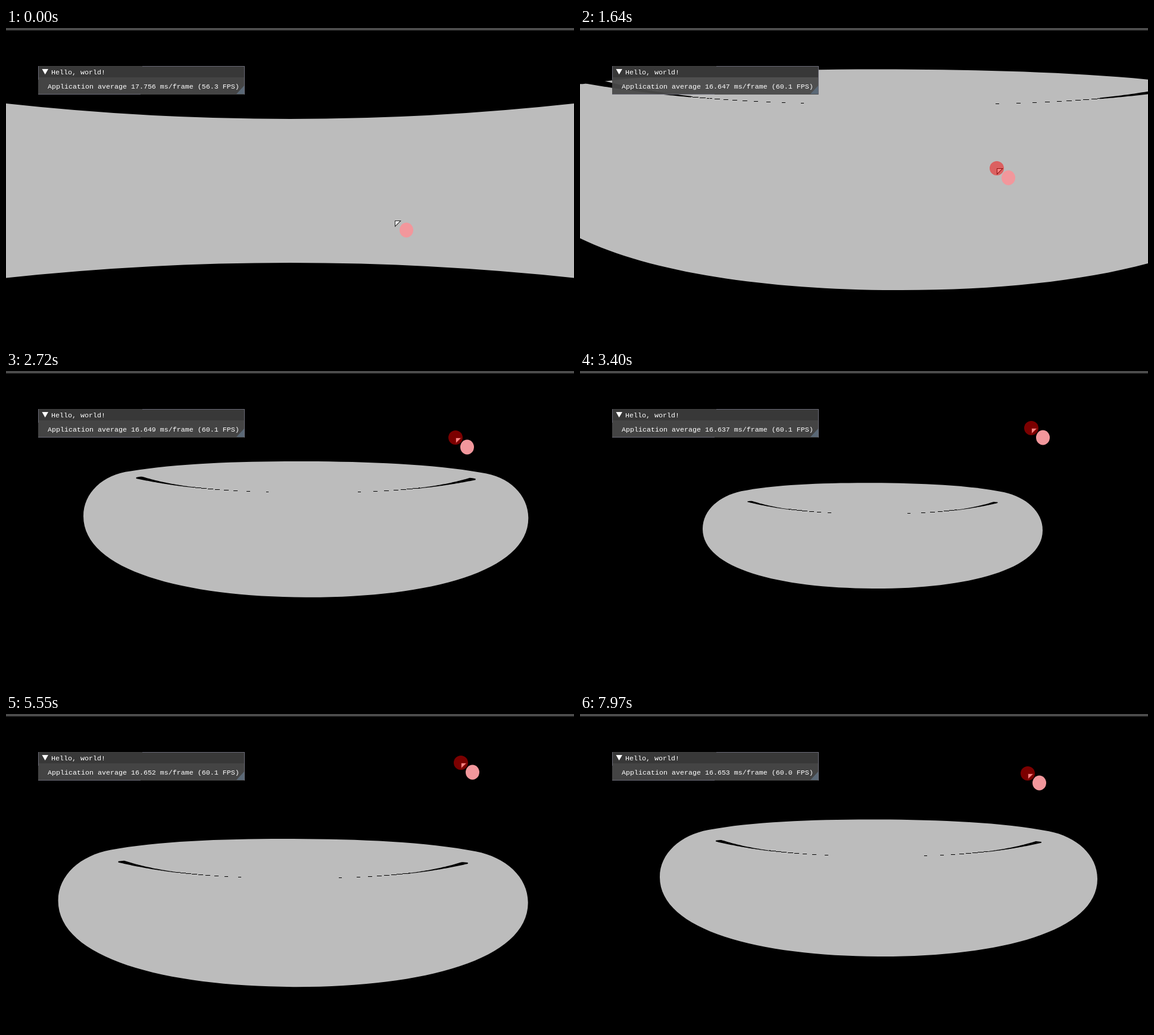
Write an HTML page with a canvas that moves like this. It is 954 px wide and 530 px high and loops after 8000 ms.

```html
<!DOCTYPE html>
<html lang="en">
<head>
<meta charset="utf-8">
<title>Torus viewer</title>
<style>
html, body { margin: 0; width: 100%; height: 100%; overflow: hidden; background: #000; }
canvas { display: block; }
</style>
</head>
<body>
<canvas id="stage" width="954" height="530"></canvas>
<script>
const ctx = document.getElementById('stage').getContext('2d');
const W = 954, H = 530, LOOP = 8000, EXIT = 420;
const GRAY = '#bcbcbc';

// time, centre x, width, y of widest point, bottom y, distance blend
const torusKeys = [
  [420, 480, 5000, 262, 1150, 0],
  [940, 490, 4000, 260, 970, 0],
  [1250, 510, 2600, 245, 710, 0],
  [1640, 530, 1300, 210, 441, 0],
  [1950, 538, 1060, 165, 353, 0],
  [2250, 544, 882, 222, 379, 0],
  [2460, 531, 862, 105, 260, 0.2],
  [2850, 490, 690, 316, 441, 0.9],
  [3400, 491.5, 571, 267, 366, 1.15],
  [4100, 475, 675, 302, 424, 1.05],
  [4640, 493, 762, 313, 452, 1],
  [4930, 518, 826, 311, 460, 1],
  [5400, 488, 800, 314, 460, 1],
  [5760, 474, 774, 318, 458, 1],
  [6460, 477.5, 661, 311, 428, 1.03],
  [7000, 478, 720, 318, 448, 1],
  [7420, 478, 734, 316, 449, 1],
  [7970, 501.5, 735, 276, 408, 1]
];

// time, x, y
const mouseKeys = [
  [0, 653, 324], [500, 640, 325], [940, 636, 325], [1500, 690, 250],
  [2000, 726, 200], [2250, 748, 108], [2460, 744, 165], [2850, 760, 86],
  [3400, 758, 96], [4000, 761, 79], [4640, 765, 83], [5600, 764, 82],
  [6460, 761, 81], [7200, 758, 82], [7970, 752, 100]
];

const frameMs = [
  [0, 17.756], [940, 16.634], [2250, 16.658], [3400, 16.637],
  [4640, 16.652], [6460, 16.652], [7970, 16.653]
];

const mix = (a, b, f) => a + (b - a) * f;

function sample(keys, t) {
  let i = 0;
  while (i < keys.length - 2 && t > keys[i + 1][0]) i++;
  const a = keys[i], b = keys[i + 1];
  const f = Math.min(1, Math.max(0, (t - a[0]) / (b[0] - a[0])));
  return a.slice(1).map((v, n) => mix(v, b[n + 1], f));
}

function fillPoly(color, ...pts) {
  ctx.fillStyle = color;
  ctx.beginPath();
  pts.forEach(p => ctx.lineTo(p[0], p[1]));
  ctx.closePath();
  ctx.fill();
}

function box(color, x, y, w, h) {
  ctx.fillStyle = color;
  ctx.fillRect(x, y, w, h);
}

// View from inside the hole
function drawWall(t) {
  const d = t / EXIT * 10;
  ctx.fillStyle = GRAY;
  ctx.beginPath();
  ctx.moveTo(0, 127 + d);
  ctx.quadraticCurveTo(W / 2, 179 + d, W, 127 + d);
  ctx.lineTo(W, 420.5 - d);
  ctx.quadraticCurveTo(W / 2, 369.5 - d, 0, 420.5 - d);
  ctx.fill();
}

function drawTorus(t) {
  const [cx, w, m, bottom, s] = sample(torusKeys, t);
  const half = w / 2, up = w * mix(0.108, 0.134, s), top = m - up;
  const tilt = x => 0.004 * (x - cx);
  const sx = w * mix(0.404, 0.389, s), sy = top + up * 0.19;
  const slope = mix(-0.02, 0.19, s), lead = w * 0.063;
  const low = m + (bottom - m) * 0.677;

  // one side of the outline, from top centre to bottom centre
  const side = [
    [0, top],
    [w * 0.137, top], [w * 0.287, top + up * 0.04], [sx, sy],
    [sx + lead, sy + lead * slope], [half, m - up * 0.41], [half, m],
    [half, low], [half * 0.546, bottom], [0, bottom]
  ];
  const place = (p, dir) => {
    const x = cx + dir * p[0];
    return [x, p[1] + tilt(x)];
  };
  const curves = pts => {
    for (let i = 1; i < pts.length; i += 3)
      ctx.bezierCurveTo(...pts[i], ...pts[i + 1], ...pts[i + 2]);
  };
  ctx.fillStyle = GRAY;
  ctx.beginPath();
  ctx.moveTo(...place(side[0], 1));
  curves(side.map(p => place(p, 1)));
  curves(side.map(p => place(p, -1)).reverse());
  ctx.fill();

  if (t > 1500) [-1, 1].forEach(dir => drawCrease(dir, cx, w, top, up, s, tilt));
}

// Dark sliver along the near rim: thick at the tip, broken up toward the middle
function drawCrease(dir, cx, w, top, up, s, tilt) {
  const reach = w * mix(0.4, 0.372, s);
  const tipY = top + up * mix(0.18, 0.38, s);
  const midY = top + up * mix(0.416, 0.62, s);
  const thick = w * mix(0.0105, 0.008, s);
  const curve = u => {
    const x = cx + dir * reach * (1 - u);
    return [x, mix(tipY, midY, 1 - Math.pow(1 - u, 2.7)) + tilt(x)];
  };
  const upper = [], lower = [];
  for (let i = 0; i <= 40; i++) {
    const u = i / 40 * 0.34, [x, y] = curve(u);
    const h = thick * Math.min(1, 0.3 + u / 0.05) * Math.exp(-u / 0.17);
    lower.push([x, y + 0.7]);
    upper.unshift([x, y - h + 0.7]);
  }
  fillPoly('#000', ...lower, ...upper);

  let row = -1, run = 0;
  for (let n = Math.round(reach * 0.33); n < reach * 0.78; n++) {
    const u = n / reach, [x, y] = curve(u), r = Math.floor(y);
    run = r === row ? run + 1 : 0;
    row = r;
    if (run < 14 * (1.05 - u)) box('#000', Math.floor(x), r, 1, 1);
  }
}

function drawPanel(t) {
  const [ms] = sample(frameMs, t);
  box('rgba(73,73,73,.94)', 54, 64, 347, 48);
  box('#383838', 55, 65, 345, 18);
  const edge = '#6c6c78';
  box(edge, 229, 64, 172, 1);
  box(edge, 54, 64, 1, 23);
  box(edge, 54, 111, 172, 1);
  box(edge, 400, 64, 1, 48);
  fillPoly('#5a6876', [387, 111], [400, 111], [400, 97]);
  fillPoly('#fff', [60.5, 69], [71, 69], [65.7, 78.3]);
  ctx.fillStyle = '#fff';
  ctx.font = '11.667px "Liberation Mono", monospace';
  ctx.fillText('Hello, world!', 76, 78);
  ctx.fillText(`Application average ${ms.toFixed(3)} ms/frame (${(1000 / ms).toFixed(1)} FPS)`, 70, 102);
}

function drawMouse(t) {
  const [x, y] = sample(mouseKeys, t).map(Math.round);
  ctx.fillStyle = '#f2979c';
  ctx.beginPath();
  ctx.ellipse(x + 19.5, y + 16, 11.5, 12.5, 0, 0, 7);
  ctx.fill();
  fillPoly('#222', [x, y], [x + 11, y], [x, y + 11]);
  fillPoly('#fff', [x + 1, y + 1], [x + 8.6, y + 1], [x + 1, y + 8.6]);
  if (t > 600) {
    ctx.fillStyle = 'rgba(250,0,0,.49)';
    ctx.beginPath();
    ctx.arc(x, y, 12, 0, 7);
    ctx.fill();
  }
}

function draw(now) {
  const t = now % LOOP;
  box('#000', 0, 0, W, H);
  if (t < EXIT) drawWall(t);
  else drawTorus(t);
  drawPanel(t);
  drawMouse(t);
  box('#4b4b4b', 0, 0, W, 4);
}

let start;
function tick(now) {
  start ??= now;
  draw(now - start);
  requestAnimationFrame(tick);
}
draw(0);
requestAnimationFrame(tick);
</script>
</body>
</html>
```
